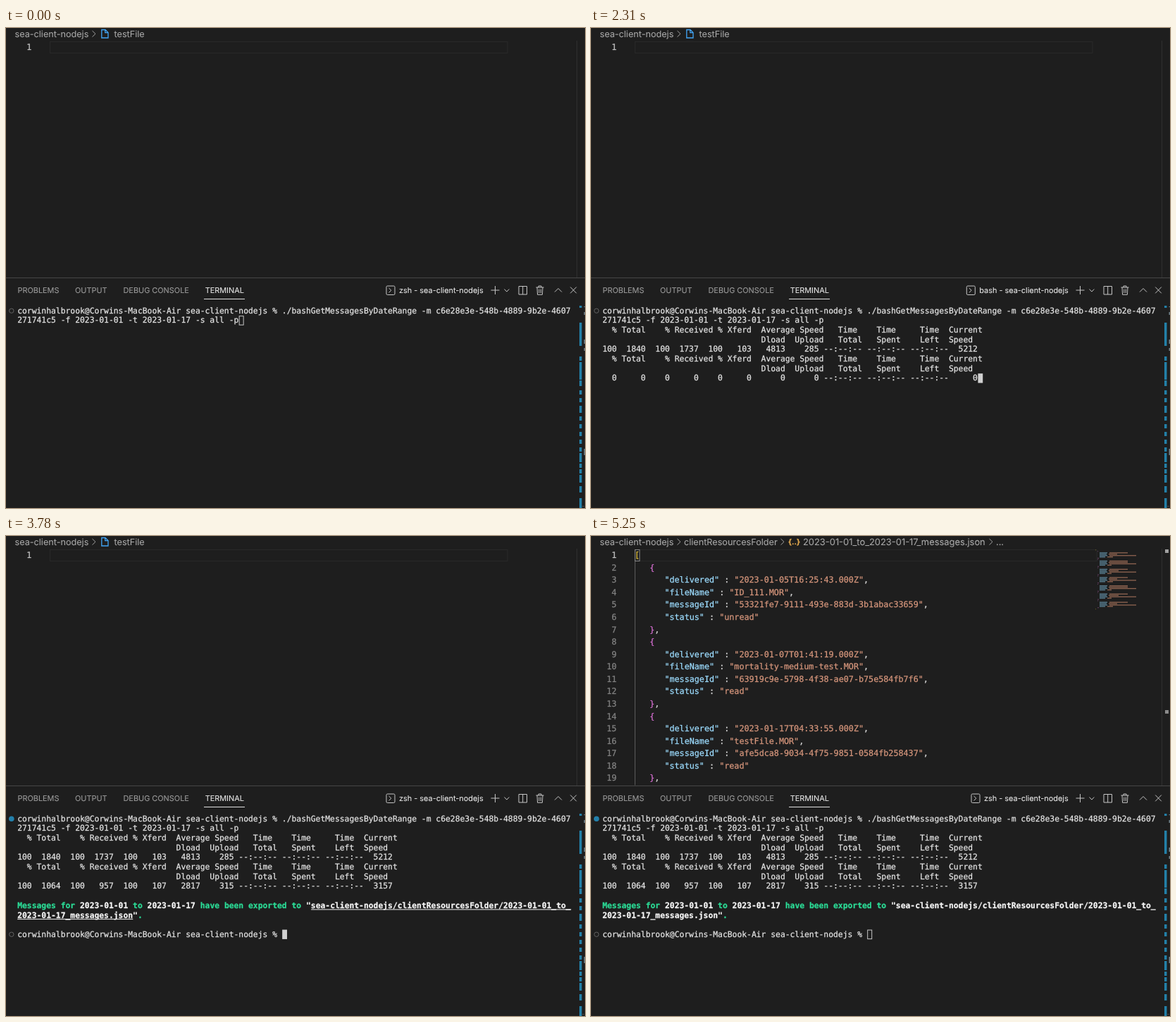
Animation of 822x681 px, one loop 5.39 s. Source, as an HTML page:

```html
<!DOCTYPE html>
<html lang="en">
<head>
<meta charset="utf-8">
<title>Terminal export</title>
<style>
  html, body { margin: 0; width: 100%; height: 100%; overflow: hidden; background: #1e1e1e; }
  svg { display: block; }
  text { white-space: pre; text-rendering: geometricPrecision; color: #dadada; }
  text, tspan { fill: currentColor; stroke: currentColor; stroke-width: .25; }
  .crumb { font: 12.65px Inter, sans-serif; color: #a6a6a6; stroke-width: .1; }
  .file { font-size: 12.9px; }
  .tab { font: 10.9px Inter, sans-serif; color: #9a9a9a; stroke-width: .1; }
  .on { color: #e7e7e7; }
  .code { font: 11.745px "DejaVu Sans Mono", monospace; }
  .term { font: 11.355px "DejaVu Sans Mono", monospace; color: #e4e4e4; }
  .num { color: #858585; text-anchor: end; }
  .num.on { color: #c6c6c6; }
  .key { color: #9cdcfe; }
  .str { color: #d6967c; }
  .brace { color: #da70d6; }
  .root { color: #e8c63c; }
  .ok { color: #2bdc96; font-weight: bold; }
  .hi { color: #f6f6f6; font-weight: bold; }
  .json { font: bold 10.5px Inter, sans-serif; color: #e0a84e; }
  .icon { fill: none; stroke: #c5c5c5; stroke-width: 1; }
</style>
</head>
<body>
<svg id="stage" width="822" height="681" viewBox="0 0 822 681"></svg>
<script>
const NS = 'http://www.w3.org/2000/svg';
const stage = document.getElementById('stage');
const LOOP = 5390;
const OPEN = 4340;
const timed = [];

function add(tag, attrs, parent = stage) {
  const node = document.createElementNS(NS, tag);
  for (const k in attrs) node.setAttribute(k, attrs[k]);
  return parent.appendChild(node);
}

// A group that is visible from one time to another
function during(from, to = LOOP) {
  const node = add('g', {});
  timed.push({ node, from, to });
  return node;
}

const rect = (x, y, width, height, fill, parent) =>
  add('rect', { x, y, width, height, fill }, parent);

const icon = (d, parent, stroke) =>
  add('path', stroke ? { d, class: 'icon', style: `stroke:${stroke}` } : { d, class: 'icon' }, parent);

// Content is a string or a list of [class, string] parts
function text(x, y, content, cls, parent) {
  const node = add('text', { x, y, class: cls }, parent);
  if (typeof content === 'string') node.textContent = content;
  else for (const [c, s] of content) add('tspan', { class: c }, node).textContent = s;
  return node;
}

// ---- Editor ----
const ROW = 17.57, CHAR = 7.07, EDIT_X = 62;
const lineY = n => 31.2 + (n - 1) * ROW;
const lineNumber = (n, parent) =>
  text(36.3, lineY(n), String(n), n === 1 ? 'code num on' : 'code num', parent);

function currentLine(end, parent) {
  add('rect', { x: 62.5, y: 19.5, width: end - 62.5, height: 16, fill: 'none', stroke: '#292929' }, parent);
}

rect(810, 18, 1, 336, '#2f2f2f');
text(12.5, 12.5, 'sea-client-nodejs', 'crumb');
icon('M122.5 4 l4.5 4.3 l-4.5 4.3', stage, '#a0a0a0');

const empty = during(0, OPEN);
currentLine(712, empty);
lineNumber(1, empty);
icon('M135.8 2.5 h5.2 l4 4 v7.5 h-9.2 z M140.8 2.7 v4 h4', empty, '#42a5f5').style.strokeWidth = 1.3;
text(153.5, 12.5, 'testFile', 'crumb', empty);

const opened = during(OPEN);
text(132, 12.5, 'clientResourcesFolder', 'crumb', opened);
icon('M269.5 4 l4.5 4.3 l-4.5 4.3 M565.5 4 l4.5 4.3 l-4.5 4.3', opened, '#a0a0a0');
text(280, 11.8, '{..}', 'json', opened);
text(301, 12.5, '2023-01-01_to_2023-01-17_messages.json', 'crumb file', opened);
text(575, 12.5, '...', 'crumb', opened);

currentLine(718, opened);
rect(62, 36, 1, 317.5, '#5c5c5c', opened);

const messages = [
  ['2023-01-05T16:25:43.000Z', 'ID_111.MOR', '53321fe7-9111-493e-883d-3b1abac33659', 'unread'],
  ['2023-01-07T01:41:19.000Z', 'mortality-medium-test.MOR', '63919c9e-5798-4f38-ae07-b75e584fb7f6', 'read'],
  ['2023-01-17T04:33:55.000Z', 'testFile.MOR', 'afe5dca8-9034-4f75-9851-0584fb258437', 'read']
];
const fields = ['delivered', 'fileName', 'messageId', 'status'];

for (let n = 1; n <= 19; n++) lineNumber(n, opened);
text(EDIT_X, lineY(1), '[', 'code root', opened);
messages.forEach((values, i) => {
  const top = 2 + i * 6;
  text(EDIT_X + 3 * CHAR, lineY(top), '{', 'code brace', opened);
  fields.forEach((name, j) => {
    const parts = [['key', `"${name}"`], ['', ' : '], ['str', `"${values[j]}"`]];
    if (j < 3) parts.push(['', ',']);
    text(EDIT_X + 6 * CHAR, lineY(top + 1 + j), parts, 'code', opened);
  });
  text(EDIT_X + 3 * CHAR, lineY(top + 5), [['brace', '}'], ['', ',']], 'code', opened);
});

// Minimap: one thin bar per key and value
const map = add('g', { opacity: 0.75 }, opened);
const mapY = n => 19.3 + (n - 1) * 1.95;
rect(716, mapY(1), 1, 1, '#8a7a20', map);
for (let i = 0; i < 7; i++) {
  const values = messages[i % 3], top = 2 + i * 6;
  rect(719, mapY(top), 1, 1, '#7a4a78', map);
  fields.forEach((name, j) => {
    const keyLen = name.length + 2, y = mapY(top + 1 + j);
    rect(722, y, keyLen, 1.3, '#6ea3bd', map);
    rect(725 + keyLen, y, values[j].length + 2, 1.3, '#b57c62', map);
  });
  rect(719, mapY(top + 5), 2, 1, '#7a4a78', map);
}
rect(716, mapY(44), 1, 1, '#8a7a20', map);

rect(62, 19, 1.5, 17, '#aeafad', during(OPEN, 4830));
const marks = during(4410);
add('rect', { x: 62.5, y: 19.5, width: 6.5, height: 16, fill: 'none', stroke: '#888' }, marks);
rect(815, 19, 5, 5, '#a0a0a0', marks);
rect(815, 247, 5, 5, '#8a8a8a', marks);

// ---- Panel header ----
rect(0, 354, 822, 1, '#474747');
[[16.5, 'PROBLEMS'], [98, 'OUTPUT'], [166.5, 'DEBUG CONSOLE']]
  .forEach(([x, s]) => text(x, 376, s, 'tab'));
text(282.7, 376, 'TERMINAL', 'tab on');
rect(281, 384, 58, 1, '#e0e0e0');

function shellLabel(name, x, from, to) {
  const g = during(from, to);
  add('rect', { x: x + .5, y: 366, width: 12, height: 12.5, rx: 1.5, class: 'icon' }, g);
  icon(`M${x + 4} 369 l3.4 3.2 l-3.4 3.2`, g);
  text(x + 18.5, 376, name + ' - sea-client-nodejs', 'tab on', g);
}
shellLabel('zsh', 539.5, 0, 1890);
shellLabel('bash', 532.8, 1890, 2870);
shellLabel('zsh', 539.5, 2870);

icon('M688.5 372 h12 M694.5 366 v12');
icon('M707.5 370.5 l3.4 3.6 l3.4 -3.6');
icon('M728 366.5 h11.5 v11.5 h-11.5 z M733.7 366.5 v11.5');
icon('M752.5 368 h11 M756 368 v-2 h4 v2 M754 368 l.6 10.3 h6.8 l.6 -10.3 M756.8 370.5 v5.5 M759.3 370.5 v5.5');
icon('M779 374.5 l5 -5 l5 5');
icon('M801.2 367.5 l8.6 8.8 M809.8 367.5 l-8.6 8.8');

// ---- Terminal ----
const CELL = 6.836, LINE = 13.67, TERM_X = 16.2;
const colX = c => TERM_X + c * CELL;
const termY = r => 404.8 + r * LINE;

function print(row, content, from, to) {
  text(TERM_X, termY(row), content, 'term', during(from, to));
}

const prompt = 'corwinhalbrook@Corwins-MacBook-Air sea-client-nodejs % ';
const head = [
  '  % Total    % Received % Xferd  Average Speed   Time    Time     Time  Current',
  '                                 Dload  Upload   Total   Spent    Left  Speed'
];
const clock = ' --:--:-- --:--:-- --:--:--';
const widths = [3, 6, 5, 6, 5, 6, 7, 7];
const stats = (values, speed) =>
  values.map((v, i) => String(v).padStart(widths[i])).join('') + clock + String(speed).padStart(6);
const zeros = stats(Array(8).fill(0), 0);

print(0, prompt + './bashGetMessagesByDateRange -m c6e28e3e-548b-4889-9b2e-4607', 0);
print(1, '271741c5 -f 2023-01-01 -t 2023-01-17 -s all -p', 0);

function transfer(row, start, end, result) {
  head.forEach((s, i) => print(row + i, s, start));
  print(row + 2, zeros, start, end);
  print(row + 2, result, end);
}
transfer(2, 1820, 2240, stats([100, 1840, 100, 1737, 100, 103, 4813, 285], 5212));
transfer(5, 2310, 2660, stats([100, 1064, 100, 957, 100, 107, 2817, 315], 3157));

print(9, [
  ['ok', 'Messages for '], ['hi', '2023-01-01'], ['ok', ' to '], ['hi', '2023-01-17'],
  ['ok', ' have been exported to '],
  ['hi', '"sea-client-nodejs/clientResourcesFolder/2023-01-01_to_']
], 2730);
print(10, [['hi', '2023-01-17_messages.json"'], ['ok', '.']], 2730);
print(12, prompt, 2800);

// Link underline on hover
[[3780, OPEN], [4690, 4830]].forEach(([from, to]) => {
  const g = during(from, to);
  rect(colX(61), termY(9) + 1.6, 54 * CELL, 1, '#f2f2f2', g);
  rect(colX(0), termY(10) + 1.6, 24 * CELL, 1, '#f2f2f2', g);
});

// Command status dots
const ring = (row, from, to) => add('circle', {
  cx: 7.8, cy: 401.2 + row * LINE, r: 3.2, fill: 'none', stroke: '#626262'
}, during(from, to));
ring(0, 0, 2800);
ring(12, 2800);
add('circle', { cx: 7.8, cy: 401.2, r: 3.8, fill: '#2380ab' }, during(2800));

// Cursor: from, to, column, row, focused
[
  [0, 840, 46, 1, false],
  [840, 1610, 46, 1, true],
  [1610, 1820, 0, 2, true],
  [1820, 2240, 78, 4, true],
  [2240, 2310, 0, 5, true],
  [2310, 2660, 78, 7, true],
  [2660, 2730, 0, 8, true],
  [2730, 2800, 0, 12, true],
  [2800, OPEN, 55, 12, true],
  [OPEN, LOOP, 55, 12, false]
].forEach(([from, to, col, row, focused]) => {
  const g = during(from, to), x = colX(col), y = 394.5 + row * LINE;
  if (focused) rect(x, y, CELL, 13.4, '#d0d0d0', g);
  else add('rect', { x: x + .5, y: y + .5, width: 6, height: 12.6, class: 'icon' }, g);
});

// Mouse pointer
const beam = during(1330, 1610);
const beamPath = 'M389.5 424 q3.5 0 3.5 2.5 q0 -2.5 3.5 -2.5 M393 426 v12 M390.5 433 h5 M389.5 440 q3.5 0 3.5 -2.5 q0 2.5 3.5 2.5';
icon(beamPath, beam, '#f4f4f4').style.strokeWidth = 2.6;
icon(beamPath, beam, '#111');

// Overview ruler: [top, height]
[
  [394, 3], [418, 33], [466, 6], [474, 25], [500, 8], [514, 6], [525, 6], [536, 10],
  [551, 6], [562, 6], [573, 6], [584, 6], [595, 6], [603, 13], [618, 6], [626, 6],
  [634, 11], [650, 9], [667, 14]
].forEach(([y, h]) => rect(814, y, 3.5, h, '#2380a8'));
[[395, 1], [403, 4], [442, 6], [454, 4], [597, 9]]
  .forEach(([y, h]) => rect(820.5, y, 1.5, h, '#6d7f88'));
rect(818, 678, 3, 1, '#4a4a4a');

const start = performance.now();
function tick() {
  const t = (performance.now() - start) % LOOP;
  for (const { node, from, to } of timed) {
    node.style.display = t >= from && t < to ? '' : 'none';
  }
  requestAnimationFrame(tick);
}
tick();
</script>
</body>
</html>
```
